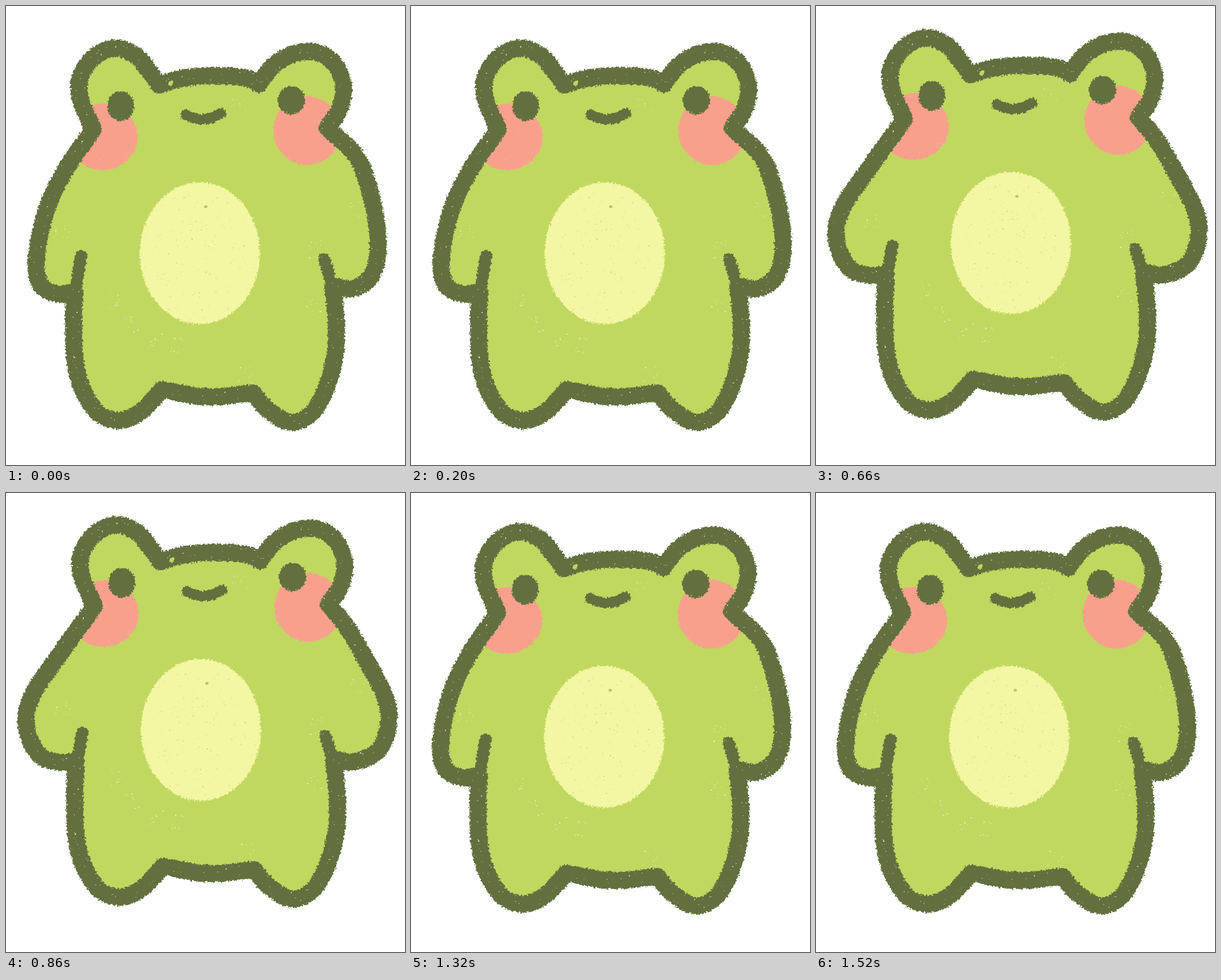
Write an HTML page that moves like this. It is 697 by 803 pixels and loops after 1650 ms.

```html
<!DOCTYPE html>
<html lang="en">
<head>
<meta charset="utf-8">
<title>Bouncing frog</title>
<style>
  html, body { margin: 0; width: 100%; height: 100%; overflow: hidden; background: #fff; }
  svg { display: block; width: 100%; height: 100%; }
</style>
</head>
<body>
<svg viewBox="0 0 697 803">
  <defs>
    <filter id="crayon" filterUnits="userSpaceOnUse" x="0" y="0" width="697" height="803" color-interpolation-filters="sRGB">
      <feTurbulence type="fractalNoise" baseFrequency="0.3" numOctaves="2" seed="7"/>
      <feDisplacementMap in="SourceGraphic" scale="8" xChannelSelector="R" yChannelSelector="G"/>
    </filter>
  </defs>
  <g id="frog"></g>
</svg>
<script>
const DARK = '#62703f', GREEN = '#c0d860', BELLY = '#f3f6a2', PINK = '#f9a08c';
const LINE = 30;

// Key points of the outline, clockwise; curves meet in corners.
const head = [
  '152,216 127,145 146,97 188,74 226,86 247,110 267,138',
  '267,138 310,126 370,122 425,127 441,137',
  '441,137 472,100 520,80 563,91 589,135 582,182 561,213'
];
const legs = [
  '571,490 577,560 571,630 540,705 500,728 457,706 431,677',
  '431,677 350,684 272,671',
  '272,671 235,710 195,725 155,706 124,640 118,545 120,500'
];
const arms = {
  down: {
    right: '561,213 611,262 636,325 650,410 640,469 607,494 571,490',
    left: '120,500 90,504 60,487 53,440 73,350 105,285 152,216'
  },
  out: {
    right: '561,213 591,249 628,312 659,372 667,415 650,466 608,488 571,484',
    left: '120,487 90,489 54,474 33,420 45,370 75,324 152,216'
  }
};
const armpits = 'M131 437L121 500M556 443L572 495';
const gaps = '193,515 218,557 262,586 298,590 538,525 418,645 96,398 610,355 538,425 405,175';

// Hold positions: x shift, y shift, arm pose
const steps = [[0, 0, 'down'], [2, -12, 'out'], [2, -18, 'out'], [-1, -20, 'down'], [-1, -6, 'down']];
const STEP_MS = 330;

const frog = document.getElementById('frog');
const pen = document.createElement('canvas').getContext('2d');
pen.lineWidth = LINE;

function add(parent, tag, attrs) {
  const node = document.createElementNS('http://www.w3.org/2000/svg', tag);
  for (const key in attrs) node.setAttribute(key, attrs[key]);
  return parent.appendChild(node);
}

function random(seed) {
  return () => (seed = (seed * 16807) % 2147483647) / 2147483647;
}

const points = text => text.split(' ').map(s => s.split(',').map(Number));

// Smooth curve through points, handles scaled to each span
function curve(text) {
  const p = points(text);
  const dir = p.map((_, i) => {
    const a = p[Math.max(i - 1, 0)], b = p[Math.min(i + 1, p.length - 1)];
    const len = Math.hypot(b[0] - a[0], b[1] - a[1]);
    return [(b[0] - a[0]) / len, (b[1] - a[1]) / len];
  });
  let d = 'L' + p[0];
  for (let i = 1; i < p.length; i++) {
    const a = p[i - 1], b = p[i];
    const h = Math.hypot(b[0] - a[0], b[1] - a[1]) * 0.35;
    d += `C${a.map((v, k) => v + dir[i - 1][k] * h)} ${b.map((v, k) => v - dir[i][k] * h)} ${b}`;
  }
  return d;
}

const outline = pieces => 'M' + pieces.map(curve).join('').slice(1) + 'Z';

const dot = (x, y, w, h) => `M${x.toFixed(1)} ${y.toFixed(1)}h${w.toFixed(1)}v${h.toFixed(1)}h${-w.toFixed(1)}z`;

// Random specks in the box around (cx, cy), kept where the test allows
function scatter(rnd, count, cx, cy, rx, ry, keep = () => true) {
  let d = '';
  for (let i = 0; i < count; i++) {
    const u = rnd() * 2 - 1, v = rnd() * 2 - 1;
    const x = cx + u * rx, y = cy + v * ry;
    const w = 0.7 + rnd() ** 3 * 2, h = 0.7 + rnd() ** 3 * 2;
    if (keep(x, y, u, v)) d += dot(x, y, w, h);
  }
  return d;
}
const round = (x, y, u, v) => u * u + v * v < 1;

function drawPose(name) {
  const shape = outline([...head, arms[name].right, ...legs, arms[name].left]);
  const path = new Path2D(shape);
  const pose = add(frog, 'g', {});
  add(add(pose, 'clipPath', { id: 'skin-' + name }), 'path', { d: shape });

  const art = add(pose, 'g', { filter: 'url(#crayon)', 'stroke-linecap': 'round', 'stroke-linejoin': 'round' });
  const ellipse = (cx, cy, rx, ry, fill, parent = art) => add(parent, 'ellipse', { cx, cy, rx, ry, fill });
  const stroke = (d, width) => add(art, 'path', { d, fill: 'none', stroke: DARK, 'stroke-width': width });

  add(art, 'path', { d: shape, fill: GREEN });
  const skin = add(art, 'g', { 'clip-path': `url(#skin-${name})` });
  ellipse(168, 229, 62, 58, PINK, skin);
  ellipse(526, 218, 59, 60, PINK, skin);
  ellipse(338.5, 432.5, 105, 124, BELLY);
  stroke(shape, LINE);
  stroke(armpits, 21);
  ellipse(200.5, 175, 23.5, 26, DARK);
  ellipse(498.5, 165, 23.5, 25, DARK);
  stroke('M314 190Q345 208 376 187', 18);
  ellipse(288, 135, 4, 4, GREEN);

  // Paper and lower layers showing through
  const speck = (d, fill) => add(pose, 'path', { d, fill });
  const onLine = (x, y) => pen.isPointInStroke(path, x, y);
  speck(scatter(random(1717), 1600, 350, 402, 330, 342, onLine), '#dfe5cd');
  const rnd = random(9191);
  speck(points(gaps).map(([x, y]) => scatter(rnd, 11, x, y, 14, 15)).join(''), '#eff6cc');
  speck(scatter(random(2929), 220, 338, 432, 99, 118, round), '#cfd670');
  speck(scatter(random(4343), 70, 514, 222, 42, 50, round), '#dcb678');
  speck(scatter(random(5757), 45, 188, 235, 36, 46, round), '#e6c08c');
  ellipse(349, 351, 3, 2.5, '#bcc957', pose);
  return pose;
}

function play(node, frame) {
  const keys = steps.map((s, i) => ({ offset: i / steps.length, easing: 'steps(1, end)', ...frame(s) }));
  keys.push({ ...keys[keys.length - 1], offset: 1 });
  node.animate(keys, { duration: STEP_MS * steps.length, iterations: Infinity });
}

for (const name in arms)
  play(drawPose(name), s => ({ visibility: s[2] === name ? 'visible' : 'hidden' }));
play(frog, s => ({ transform: `translate(${s[0]}px, ${s[1]}px)` }));
</script>
</body>
</html>
```
